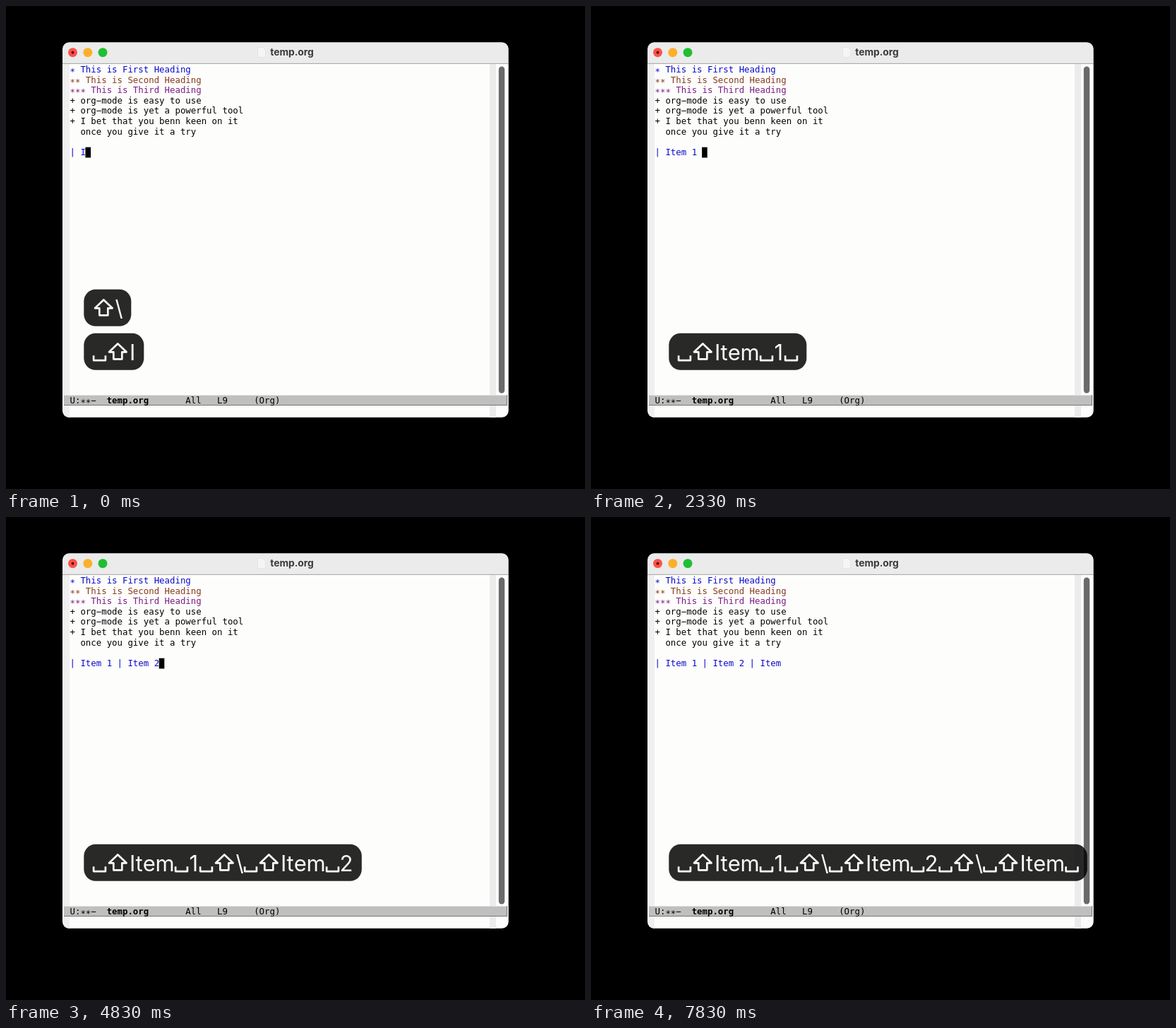
Animation of 820 by 683 pixels, one loop 8000 ms. Source, as an HTML page with a canvas:

```html
<!DOCTYPE html>
<html lang="en">
<head>
<meta charset="utf-8">
<title>temp.org</title>
<style>
  html, body { margin: 0; width: 100%; height: 100%; overflow: hidden; background: #000; }
  canvas { display: block; }
</style>
</head>
<body>
<canvas id="stage" width="820" height="683"></canvas>
<script>
const ctx = document.getElementById('stage').getContext('2d');
const LOOP = 8000;

const MONO = '12.37px "DejaVu Sans Mono", monospace';
const CELL = 7.447, LINE = 14.62, LEFT = 90.5, BASE = 94;

const BLUE = '#0808cc';
const LINES = [
  ['* This is First Heading', BLUE],
  ['** This is Second Heading', '#873a1c'],
  ['*** This is Third Heading', '#7c1c84'],
  ['+ org−mode is easy to use', '#000'],
  ['+ org−mode is yet a powerful tool', '#000'],
  ['+ I bet that you benn keen on it', '#000'],
  ['  once you give it a try', '#000']
];
const TABLE_ROW = 8;

// Typed characters and the time at which each one lands
const TYPED = ' Item 1 | Item 2 | Item ';
const TIMES = [0, 0, 330, 500, 830, 1170, 1830, 2170, 2670, 2830,
  3330, 3500, 3670, 3830, 4170, 4500, 5000, 5500, 5670, 5830,
  6170, 6500, 6830, 7170];
const BLINK = 500;

// Key caps: each typed character as the keys pressed
const KEYS = { ' ': '␣', '|': '⇧\\', 'I': '⇧I' };
const ADVANCE = { '␣': 20, '⇧': 32.5, '\\': 10.5, I: 8.5, t: 10.7, e: 17.8, m: 26.5, 1: 15, 2: 19.5 };
const PAD = 12;

function rect(x, y, w, h, color) {
  ctx.fillStyle = color;
  ctx.fillRect(x, y, w, h);
}

function round(x, y, w, h, r, color) {
  ctx.fillStyle = color;
  ctx.beginPath();
  ctx.roundRect(x, y, w, h, r);
  ctx.fill();
}

function dot(x, y, r, color) {
  ctx.fillStyle = color;
  ctx.beginPath();
  ctx.arc(x, y, r, 0, Math.PI * 2);
  ctx.fill();
}

function path(points, closed) {
  ctx.beginPath();
  points.forEach(([x, y]) => ctx.lineTo(x, y));
  if (closed) ctx.closePath();
}

// Monospaced text from a column; asterisks sit on the middle of the line
function mono(text, col, y, color, weight = '') {
  ctx.font = weight + ' ' + MONO;
  ctx.textAlign = 'left';
  ctx.fillStyle = color;
  [...text].forEach((ch, i) => {
    ctx.fillText(ch, LEFT + (col + i) * CELL, ch === '*' ? y + 3 : y);
  });
}

function drawTitleBar() {
  rect(80, 51, 632, 30, '#ebebeb');
  rect(80, 80.5, 632, 1, '#dcdcdc');
  dot(94.5, 65.7, 6.5, '#fb524b');
  dot(94.5, 65.7, 2, '#5c0505');
  dot(115.8, 65.7, 6.5, '#fbb02a');
  dot(137, 65.7, 6.5, '#20bf33');

  path([[356.5, 58.5], [363.5, 58.5], [367.5, 62.5], [367.5, 72.5], [356.5, 72.5]], true);
  ctx.fillStyle = '#f5f5f5';
  ctx.fill();
  ctx.strokeStyle = '#e0e0e0';
  ctx.lineWidth = 0.7;
  ctx.stroke();

  ctx.font = '700 13.8px Inter, sans-serif';
  ctx.textAlign = 'center';
  ctx.fillStyle = '#3a3a3a';
  ctx.fillText('temp.org', 405, 70);
}

function drawModeLine() {
  rect(82, 550, 628, 15, '#bfbfbf');
  rect(82, 550, 628, 1, '#dedede');
  rect(82, 564, 628, 1, '#777');
  rect(709, 550, 1, 15, '#777');
  mono('U:**−', 0, 562, '#000');
  mono('temp.org', 7, 562, '#000', 'bold');
  mono('All   L9     (Org)', 22, 562, '#000');
}

function drawWindow() {
  rect(80, 81.5, 632, 501, '#fdfdfc');
  rect(82, 82, 8, 500, '#f0f0f0');
  rect(685, 82, 9, 500, '#ececec');
  drawTitleBar();
  round(697.8, 85.5, 8.4, 462, 4.2, '#6a6a6a');
  LINES.forEach(([text, color], i) => mono(text, 0, BASE + i * LINE, color));
  drawModeLine();
}

function drawKey(key, x, y) {
  if (key === '⇧') {
    const c = x + 16, wing = y - 11.5;
    path([[c, y - 23.3], [c + 12.3, wing], [c + 6, wing], [c + 6, y - 1.5],
      [c - 6, y - 1.5], [c - 6, wing], [c - 12.3, wing]], true);
    ctx.stroke();
  } else if (key === '␣') {
    path([[x + 1.8, y - 6.5], [x + 1.8, y + 0.3], [x + 18.6, y + 0.3], [x + 18.6, y - 6.5]]);
    ctx.stroke();
  } else {
    ctx.fillText(key, x + ADVANCE[key] / 2, y);
  }
}

function drawPill(text, y, alpha = 1) {
  const keys = [...text].map(ch => KEYS[ch] || ch).join('');
  const width = [...keys].reduce((sum, k) => sum + ADVANCE[k], 2 * PAD);
  ctx.globalAlpha = alpha;
  round(110.3, y, width, 52, 16.5, 'rgba(0,0,0,.84)');
  ctx.font = '31px Inter, sans-serif';
  ctx.textAlign = 'center';
  ctx.fillStyle = ctx.strokeStyle = '#fafafa';
  ctx.lineWidth = 2.7;
  ctx.lineJoin = 'round';
  let x = 110.3 + PAD;
  for (const k of keys) {
    drawKey(k, x, y + 38);
    x += ADVANCE[k];
  }
  ctx.globalAlpha = 1;
}

function draw(t) {
  const count = TIMES.filter(at => at <= t).length;
  const typed = TYPED.slice(0, count);
  const idle = t - TIMES[count - 1];
  const rowY = BASE + TABLE_ROW * LINE;

  rect(0, 0, 820, 683, '#000');
  ctx.save();
  ctx.beginPath();
  ctx.roundRect(80, 51.3, 631.7, 530.4, 9.5);
  ctx.clip();
  drawWindow();
  mono('|' + typed, 0, rowY, BLUE);
  if (Math.floor(idle / BLINK) % 2 === 0) {
    rect(LEFT + (count + 1) * CELL - 0.4, rowY - 11.3, 7.6, 14.8, '#000');
  }
  ctx.restore();

  const fade = Math.min(1, Math.max(0, (870 - t) / 200));
  if (fade > 0) drawPill('|', 400.8, fade);
  drawPill(typed, 462.8);
}

const start = performance.now();
function tick() {
  draw((performance.now() - start) % LOOP);
  requestAnimationFrame(tick);
}
tick();
</script>
</body>
</html>
```
